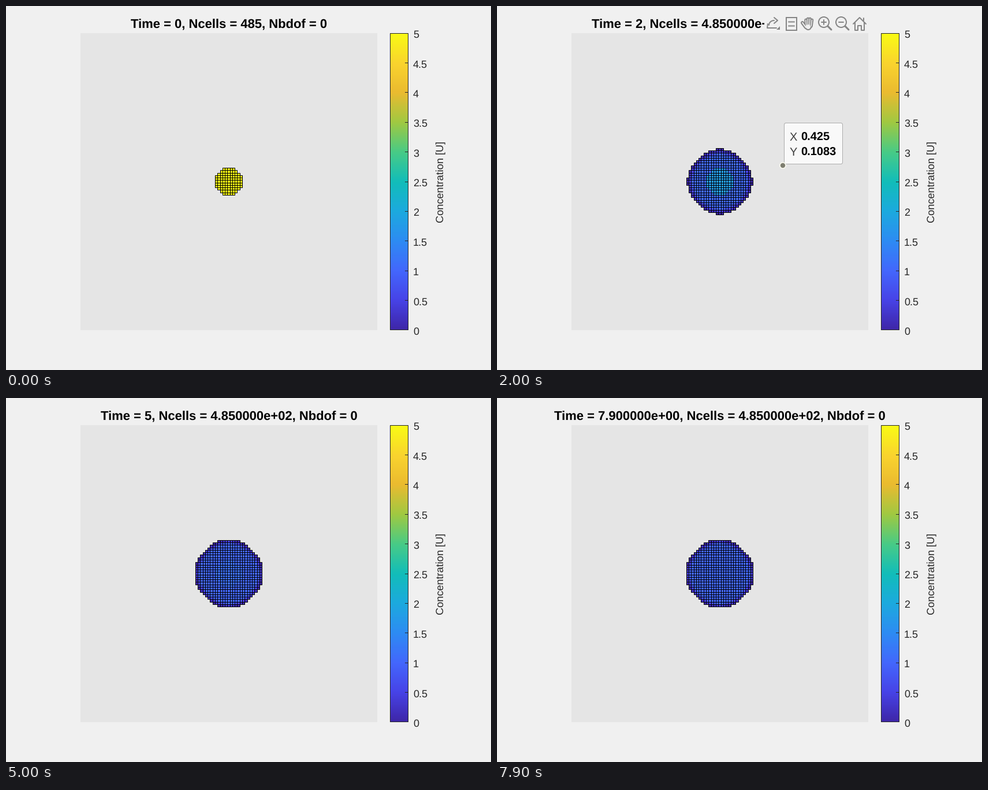
Recreate the animation shown at these times as a matplotlib script. Size 840x630 px, loop 8000 ms.

```python
import numpy as np
import matplotlib.pyplot as plt
from matplotlib.animation import FuncAnimation
from matplotlib.collections import PolyCollection
from matplotlib.colors import LinearSegmentedColormap
from matplotlib.patches import Circle, FancyBboxPatch, Polygon, Rectangle

W, H, DPI = 840, 630, 100
PX = 72 / DPI
FRAMES, STEP = 80, 100
LEFT, TOP, SIZE = 129, 47, 514
CX, CY = LEFT + SIZE / 2, TOP + SIZE / 2
PITCH = SIZE / 120
CORE_SQ = 30.25
VMAX = 5
INK, ICON, PAPER = "0.15", "0.52", "0.94"
TOOLS_ON, TOOLS_OFF = 4, 32

cmap = LinearSegmentedColormap.from_list("parula", [
    "#3e26a8", "#4743e7", "#4367fd", "#2d8cf3", "#1caade", "#12bdb9",
    "#48cb86", "#9fc942", "#eabb30", "#fad42e", "#f9fb15"])

# coordinates below are exact pixels, so no snapping
plt.rcParams.update({"font.family": "Liberation Sans", "path.snap": False,
                     "text.hinting": "none"})
fig = plt.figure(figsize=(W / DPI, H / DPI), dpi=DPI, facecolor=PAPER)
ax = fig.add_axes([0, 0, 1, 1])
ax.axis("off")


def text(x, y, s, px, **kw):
    style = {"color": INK, "va": "baseline", **kw}
    return ax.text(x, y, s, fontsize=px * PX, **style)


def line(*points, width=1, color=INK, **kw):
    x, y = zip(*points)
    return ax.plot(x, y, color=color, lw=width * PX, **kw)[0]


def draw_colorbar():
    x0, x1, y0, y1 = 665, 697, TOP, TOP + SIZE
    ramp = np.linspace(1, 0, 256)[:, None]
    ax.imshow(ramp, cmap=cmap, vmin=0, vmax=1, extent=(x0, x1, y1, y0),
              aspect="auto", interpolation="nearest")
    ax.add_patch(Rectangle((x0 + .5, y0 + .5), x1 - x0 - 1, y1 - y0 - 1,
                           fill=False, ec=INK, lw=PX))
    for k in range(11):
        y = y1 - SIZE * k / 10
        if 0 < k < 10:
            row = int(y) + .5
            line((x1 - 6, row), (x1 - 1, row), solid_capstyle="butt")
        text(705, y + 8, f"{k / 2:g}", 18)
    text(761, CY + .5, "Concentration [U]", 18.1, rotation=90,
         ha="right", va="center")


def draw_toolbar():
    parts = []
    y = 31
    share, tip, hand, zoom_in, zoom_out, home = (478 + 30 * k for k in range(6))

    def add(patch):
        patch.set_zorder(6)
        parts.append(ax.add_patch(patch))

    def stroke(*points, width=2, color=ICON):
        parts.append(line(*points, width=width, color=color, zorder=6,
                          solid_joinstyle="round", solid_capstyle="round"))

    def box(x0, y0, w, h):
        add(Rectangle((x0, y0), w, h, fill=False, ec=ICON, lw=2 * PX))

    add(Rectangle((463, 18), 178, 26, fc=PAPER, ec="none"))

    stroke((share - 9, y), (share - 10, y + 7), (share + 6, y + 7))
    bend = np.linspace(0, np.pi / 2, 8)
    stroke(*zip(share + 2 - 9 * np.cos(bend), y + 2 - 8 * np.sin(bend)))
    stroke((share + 2, y - 11), (share + 8, y - 6), (share + 2, y - 1))
    add(Polygon([(share + 6, y + 10), (share + 12, y + 10),
                 (share + 12, y + 4)], fc=ICON, ec="none"))

    box(tip - 7, y - 11, 18, 22)
    for dy in (-3.5, 3.5):
        stroke((tip - 3, y + dy), (tip + 7, y + dy))

    # outlined hand: a wide pass, then a thin one in the paper colour
    for grow, color in ((2, ICON), (0, PAPER)):
        for k in range(4):
            dx = 3.5 * k - 3
            stroke((hand + dx, y - 9 + (k - 1.5)**2), (hand + dx * .8, y + 4),
                   width=1.5 + 2 * grow, color=color)
        stroke((hand - 9, y - 2), (hand - 3, y + 6), width=2 + 2 * grow,
               color=color)
        add(Circle((hand + 1, y + 5), 4 + grow, fc=color, ec="none"))

    for x in (zoom_in, zoom_out):
        add(Circle((x - 2, y - 3), 9, fill=False, ec=ICON, lw=2 * PX))
        stroke((x + 5, y + 4), (x + 11, y + 10), width=3)
        stroke((x - 6, y - 3), (x + 2, y - 3))
    stroke((zoom_in - 2, y - 7), (zoom_in - 2, y + 1))

    stroke((home - 11, y), (home, y - 11), (home + 11, y))
    for s in (-1, 1):
        stroke((home + 8 * s, y - 2), (home + 8 * s, y + 11),
               (home + 3 * s, y + 11), (home + 3 * s, y + 3), (home, y + 3))
    stroke((home + 7, y - 10), (home + 7, y - 6))
    return parts


def draw_datatip():
    parts = [
        ax.add_patch(FancyBboxPatch(
            (500.5, 205.5), 95, 65, boxstyle="round,pad=3,rounding_size=3",
            fc="0.975", ec="0.68", lw=PX, zorder=5)),
        ax.add_patch(Circle((495, 276), 6, fc="#f8f8ee", ec="none", zorder=5)),
        ax.add_patch(Circle((495, 276), 4.2, fc="#7e7e70", ec="none", zorder=6)),
    ]
    for y, name, value in ((233, "X", "0.425"), (259, "Y", "0.1083")):
        parts.append(text(507, y, name, 20, color="0.25", zorder=6))
        parts.append(text(526, y, value, 20, color="k", weight="bold", zorder=6))
    return parts


# cell lattice around the middle of the domain
ii, jj = (g.ravel() for g in np.mgrid[-14:15, -14:15])
r_sq = (ii**2 + jj**2).astype(float)
# squared distance, slightly longer along the diagonals
reach = r_sq + 0.3 * (ii * jj)**2 / np.maximum(r_sq, 1)
core = r_sq <= CORE_SQ


def edge(c, k):
    return np.floor(c + k * PITCH) + .5


xa, xb = edge(CX, ii - .5), edge(CX, ii + .5)
ya, yb = edge(CY, jj - .5), edge(CY, jj + .5)
quads = np.stack([np.stack(p, 1) for p in
                  ((xa, ya), (xb, ya), (xb, yb), (xa, yb))], 1)


def front(t):
    return 194.2 - 163.2 * np.exp(-(t / 0.8932)**0.8995)


def concentration(t):
    depth = np.sqrt(front(t)) - np.sqrt(reach)
    ramp = 1.9 + 2.5 * np.exp(-t)
    ring = (1 + 0.35 * np.exp(-t)) * np.clip(depth / ramp, 0.02, 1)**1.3
    excess = 4 * np.exp(-(t / 1.056)**0.806)
    dome = 1 + 0.15 * min(t, 1) * (0.5 - r_sq / CORE_SQ)
    return np.where(core, 1 + excess * dome, ring)


def number(v):
    return f"{v:.0f}" if v == int(v) else f"{v:e}"


ax.add_patch(Rectangle((LEFT, TOP), SIZE, SIZE, fc="0.898", ec="none",
                       antialiased=False))
draw_colorbar()
cells = PolyCollection([], edgecolors="k", linewidths=PX, zorder=3)
ax.add_collection(cells, autolim=False)
title = text(CX, 39, "", 22, ha="center", weight="bold", color="k", zorder=4)
overlay = draw_toolbar() + draw_datatip()
ax.set_xlim(0, W)
ax.set_ylim(H, 0)


def update(i):
    t = i * STEP / 1000
    # the summed mass picks up a rounding error once it spreads
    total = 485 if i == 0 else 485 * (1 + 1e-12)
    live = reach <= front(t)
    cells.set_verts(quads[live])
    cells.set_facecolor(cmap(concentration(t)[live] / VMAX))
    title.set_text(f"Time = {number(t)}, Ncells = {number(total)}, Nbdof = 0")
    for part in overlay:
        part.set_visible(TOOLS_ON <= i < TOOLS_OFF)
    return [cells, title, *overlay]


anim = FuncAnimation(fig, update, frames=FRAMES, interval=STEP,
                     init_func=lambda: update(0), repeat=True, repeat_delay=0)
plt.show()
```
